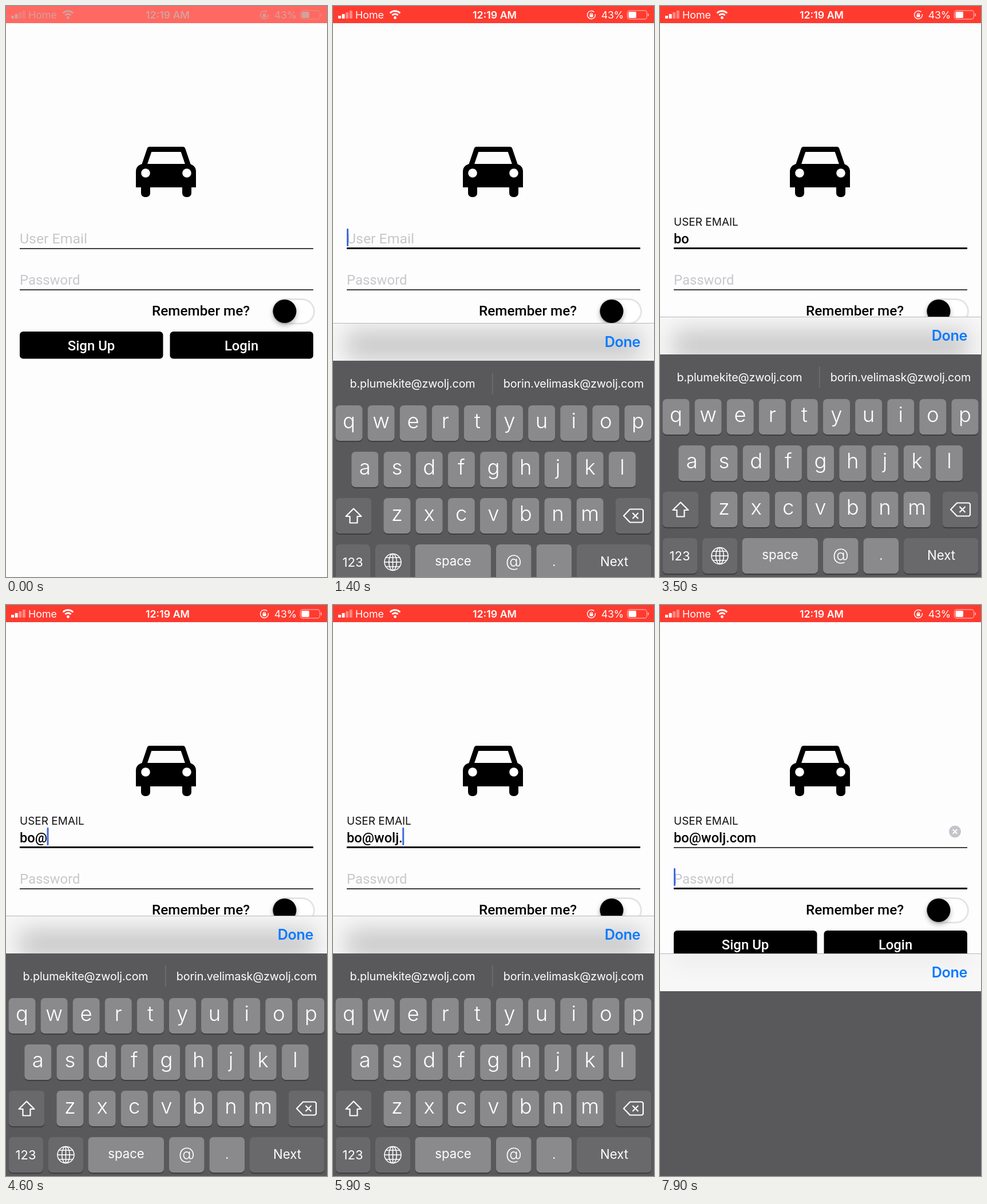
These frames come from a looping animation (561x998 px, 8 s). An HTML page with a canvas:

```html
<!DOCTYPE html>
<html lang="en">
<head>
<meta charset="utf-8">
<title>Login form</title>
<style>
html, body { margin: 0; width: 100%; height: 100%; overflow: hidden; background: #fff; }
canvas { display: block; width: 561px; height: 998px; }
</style>
</head>
<body>
<canvas id="stage" width="561" height="998"></canvas>
<script>
const ctx = document.getElementById('stage').getContext('2d');
const W = 561, H = 998, LOOP = 8000, STEP = 100;
const UI = 'Inter, sans-serif', FORM = 'Roboto, sans-serif';

const EMAIL = 'bo@wolj.com';
const HINTS = ['b.plumekite@zwolj.com', 'borin.velimask@zwolj.com'];
const PRESS = [2200, 2600, 4400, 4800, 5000, 5200, 5400, 5700, 6100, 6400, 6700];
const TYPED = [2400, 2800, 4600, 5000, 5200, 5400, 5500, 5900, 6200, 6600, 6900];
const FOCUS = 1200, NUMERIC = 7200, NEXT = 7700, SWAP = 7800, SECURE = 7900;

const BAR_TOP = 543, BAR_H = 66;
const KEY = '#8a898b', DARK_KEY = '#69686a', BOARD = '#59585a';

const clamp = v => Math.max(0, Math.min(1, v));
const mix = (a, b, k) => `rgb(${a.map((v, i) => Math.round(v + (b[i] - v) * k)).join()})`;

function text(str, x, y, size, { color = '#fff', weight = 400, align = 'left', font = UI, gap = 0 } = {}) {
  ctx.font = `${weight} ${size}px ${font}`;
  ctx.letterSpacing = gap + 'px';
  ctx.textAlign = align;
  ctx.fillStyle = color;
  ctx.fillText(str, x, y);
}

function box(x, y, w, h, r, color) {
  ctx.fillStyle = color;
  ctx.beginPath();
  ctx.roundRect(x, y, w, h, r);
  ctx.fill();
}

function disc(x, y, r, color) {
  ctx.fillStyle = color;
  ctx.beginPath();
  ctx.arc(x, y, r, 0, 7);
  ctx.fill();
}

function line(points, width, color, close) {
  ctx.beginPath();
  points.forEach(([x, y]) => ctx.lineTo(x, y));
  if (close) ctx.closePath();
  ctx.lineWidth = width;
  ctx.strokeStyle = color;
  ctx.lineJoin = 'round';
  ctx.stroke();
}

function arc(x, y, r, from, to, width, color) {
  ctx.beginPath();
  ctx.arc(x, y, r, from, to);
  ctx.lineWidth = width;
  ctx.strokeStyle = color;
  ctx.stroke();
}

function cross(x, y, r, width, color) {
  line([[x - r, y - r], [x + r, y + r]], width, color);
  line([[x + r, y - r], [x - r, y + r]], width, color);
}

function statusBar(t) {
  const k = clamp(t / 200);
  const ink = mix([212, 160, 158], [255, 255, 255], k);
  ctx.fillStyle = mix([255, 105, 97], [255, 59, 48], k);
  ctx.fillRect(0, 0, W, 30);

  for (let i = 0; i < 4; i++) {
    ctx.globalAlpha = i < 2 ? 1 : 0.4;
    box(9 + i * 6.6, 17 - i * 3, 5, 5 + i * 3, 1, ink);
  }
  ctx.globalAlpha = 1;
  text('Home', 39, 22, 17.8, { color: ink });

  const up = -Math.PI / 2;
  disc(108.5, 20.5, 2.4, ink);
  for (const r of [7, 12.2]) arc(108.5, 21, r, up - 0.8, up + 0.8, 3, ink);

  text('12:19 AM', 282.5, 22, 17.8, { color: ink, weight: 600, align: 'center' });

  arc(451.5, 15.5, 7, -0.2, 5.5, 1.4, ink);
  box(448.5, 14.5, 6, 5, 1, ink);
  arc(451.5, 14.5, 2, Math.PI, 0, 1.2, ink);

  text('43%', 508, 22, 17.8, { color: ink, align: 'right', gap: -0.2 });
  ctx.globalAlpha = 0.5;
  ctx.beginPath();
  ctx.roundRect(514.5, 8, 34, 15, 4);
  ctx.lineWidth = 1.4;
  ctx.strokeStyle = ink;
  ctx.stroke();
  box(550, 13, 2, 5, 1, ink);
  ctx.globalAlpha = 1;
  box(516.5, 10, 13.5, 11, 2, ink);
}

function car() {
  line([[241, 280], [251, 250.5], [309, 250.5], [319, 280]], 9, '#000');
  box(227, 276, 105, 41, [13, 13, 0, 0], '#000');
  for (const x of [244, 316]) {
    disc(x, 292, 7.8, '#fff');
    box(x - 8, 312, 16, 22, [0, 0, 7, 7], '#000');
  }
}

function caretAlpha(t) {
  const out = start => 1 - clamp((t - start + 100) / 300);
  if (t < 2200) return out(1700);
  if (t < 2400) return 1;
  if (t < 3800) return out(3300);
  if (t < 4300) return clamp((t - 3700) / 200);
  if (t < 4600) return out(4300);
  return 1;
}

function caret(x, y, alpha) {
  ctx.globalAlpha = alpha;
  box(x, y, 3, 31, 1, '#416be0');
  ctx.globalAlpha = 1;
}

function underline(y, active) {
  ctx.fillStyle = '#000';
  if (active) ctx.fillRect(24, y - 2, 513, 3);
  else ctx.fillRect(24, y - 0.7, 513, 1.5);
}

function form(t) {
  const onEmail = t >= FOCUS && t < SWAP, onPassword = t >= SWAP;
  const hint = { color: '#c7c7cc', font: FORM };
  const value = EMAIL.slice(0, TYPED.filter(s => t >= s).length);
  let end = 24;

  if (value) {
    const k = clamp((t - TYPED[0]) / 200);
    ctx.globalAlpha = k;
    text('USER EMAIL', 24, 384 + 20 * (1 - k), 19, { color: '#111' });
    ctx.globalAlpha = 1;
    text(value, 24, 415, 23.7, { color: '#000', weight: 500, font: FORM });
    end += ctx.measureText(value).width - 0.5;
  } else {
    text('User Email', 24, 415, 24.8, hint);
  }
  text('Password', 24, 487, 23.9, hint);
  underline(424, onEmail);
  underline(496, onPassword);
  if (onEmail) caret(end, 389, caretAlpha(t));
  if (onPassword) {
    caret(24, 460, 1);
    disc(515.5, 396, 10.5, '#c5c5c9');
    cross(515.5, 396, 3.7, 2, '#fff');
  }

  text('Remember me?', 426, 541, 24.3, { color: '#000', weight: 500, align: 'right', font: FORM });
  box(465, 511, 75, 45.5, 23, '#e4e4e7');
  box(468, 514, 69, 39.5, 20, '#fff');
  ctx.save();
  ctx.shadowColor = 'rgba(0,0,0,.3)';
  ctx.shadowBlur = 9;
  ctx.shadowOffsetY = 4;
  disc(487, 533.5, 20.5, '#000');
  ctx.restore();

  const label = { weight: 500, align: 'center', font: FORM };
  box(24, 569, 250.5, 47.5, 6, '#000');
  box(286.5, 569, 250.5, 47.5, 6, '#000');
  text('Sign Up', 149, 602, 24, label);
  text('Login', 411.5, 602, 23.8, label);
}

function toolbar(top) {
  ctx.save();
  ctx.beginPath();
  ctx.rect(0, top, W, BAR_H);
  ctx.clip();
  ctx.fillStyle = '#f7f7f8';
  ctx.fillRect(0, top, W, BAR_H);
  const y = Math.max(569, top);
  if (y < 616) {
    ctx.filter = 'blur(20px)';
    ctx.fillStyle = 'rgba(0,0,0,.2)';
    ctx.fillRect(24, y, 513, 616 - y);
    ctx.filter = 'none';
  }
  ctx.fillStyle = '#b6b6b9';
  ctx.fillRect(0, top, W, 1);
  ctx.restore();
  text('Done', 537, top + 42, 25.2, { color: '#0a7aff', weight: 600, align: 'right', gap: -0.4 });
}

function key(x, y, w, color = KEY) {
  box(x, y + 1.5, w, 62.5, 7, '#3e3d3f');
  box(x, y, w, 62, 7, color);
}

// Keys of one row: glyph, left edge, top edge, width
const row = (chars, x, y, pitch, w) => [...chars].map((c, i) => ({ c, x: x + i * pitch, y, w }));
const SHARED = [...row('@', 285, 930, 0, 61.5), ...row('.', 355.5, 930, 0, 61.5)];
const LETTERS = [
  ...row('qwertyuiop', 4.5, 687, 56.1, 47),
  ...row('asdfghjkl', 32.3, 768, 56.2, 47),
  ...row('zxcvbnm', 88.4, 849, 56.2, 47),
  ...SHARED
];
const SYMBOLS = [
  ...row('1234567890', 4.5, 687, 56.1, 47),
  ...row('$!~&=#[]', 15.7, 768, 67.3, 58.5),
  ...row('._-+', 88.2, 849, 98.6, 89),
  ...SHARED
];

function glyph({ c, x, y, w }, numeric) {
  const opts = { weight: 300, align: 'center' };
  if (y === 930) text(c, x + w / 2, y + (c === '@' ? 39 : 38), c === '@' ? 29 : 27, opts);
  else if (numeric) text(c, x + w / 2, y + 43.5, 33, opts);
  else text(c, x + w / 2, y + 40, 36.5, opts);
}

function popup({ c, x, y, w }) {
  const left = Math.max(3, x - 14), right = Math.min(W - 3, x + w + 14);
  const top = y - 86, waist = y - 24;
  ctx.save();
  ctx.shadowColor = 'rgba(0,0,0,.35)';
  ctx.shadowBlur = 4;
  ctx.shadowOffsetY = 1;
  ctx.fillStyle = KEY;
  ctx.beginPath();
  ctx.moveTo(left + 14, top);
  ctx.arcTo(right, top, right, waist, 14);
  ctx.lineTo(right, waist);
  ctx.bezierCurveTo(right, y - 6, x + w, y - 10, x + w, y + 10);
  ctx.arcTo(x + w, y + 62, x, y + 62, 7);
  ctx.arcTo(x, y + 62, x, y, 7);
  ctx.lineTo(x, y + 10);
  ctx.bezierCurveTo(x, y - 10, left, y - 6, left, waist);
  ctx.arcTo(left, top, right, top, 14);
  ctx.fill();
  ctx.restore();
  text(c, (left + right) / 2, y - 32, 50, { weight: 300, align: 'center' });
}

function shiftIcon() {
  line([[36, 867.5], [49.5, 881], [42.5, 881], [42.5, 892.5], [29.5, 892.5], [29.5, 881], [22.5, 881]], 2.2, '#fff', true);
}

function eraseIcon() {
  line([[508, 880], [519, 868.5], [540, 868.5], [542, 870.5], [542, 889.5], [540, 891.5], [519, 891.5]], 2.2, '#fff', true);
  cross(528.5, 880, 5, 2.2, '#fff');
}

function globeIcon(x, y) {
  arc(x, y, 14.5, 0, 7, 1.6, '#fff');
  ctx.beginPath();
  ctx.ellipse(x, y, 6.8, 14.5, 0, 0, 7);
  ctx.stroke();
  line([[x, y - 14.5], [x, y + 14.5]], 1.6, '#fff');
  line([[x - 14.5, y], [x + 14.5, y]], 1.6, '#fff');
  for (const d of [-8, 8]) line([[x - 12, y + d], [x + 12, y + d]], 1.5, '#fff');
}

function keys(t) {
  const numeric = t >= NUMERIC;
  const set = numeric ? SYMBOLS : LETTERS;
  const active = PRESS.findIndex((s, i) => t >= s && t < TYPED[i]);
  const held = active < 0 ? null : set.find(k => k.c === EMAIL[active]);
  const mid = { align: 'center' };

  HINTS.forEach((s, i) => text(s, i ? 420.5 : 139, 656, 19.8, { align: 'center', gap: -0.15 }));
  ctx.fillStyle = '#706f71';
  ctx.fillRect(278, 630, 1.5, 37);

  for (const k of set) {
    key(k.x, k.y, k.w);
    if (k !== held) glyph(k, numeric);
  }
  key(4.5, 849, 63, DARK_KEY);
  key(493.5, 849, 63, DARK_KEY);
  key(4.5, 930, 60.5, DARK_KEY);
  key(74, 930, 61, DARK_KEY);
  key(143.5, 930, 132.5);
  key(426, 930, 130.5, t === NEXT ? KEY : DARK_KEY);

  if (numeric) text('#+=', 35.5, 886, 16.5, mid);
  else shiftIcon();
  eraseIcon();
  text(numeric ? 'ABC' : '123', 34.5, numeric ? 967 : 969, numeric ? 20.5 : 22, mid);
  globeIcon(104.5, 961);
  text('space', 210, 967, 22.2, mid);
  text('Next', 491.5, 967.5, 22.2, mid);
  if (held) popup(held);
}

function keyboard(t) {
  // Critically damped slide-in
  const p = (t - 1095) * 0.01826;
  const off = t >= SECURE ? 66 : Math.round((H - BAR_TOP) * (1 + p) * Math.exp(-p));
  const top = BAR_TOP + off;
  toolbar(top);
  ctx.fillStyle = BOARD;
  ctx.fillRect(0, top + BAR_H, W, H);
  if (t >= SECURE) return;
  ctx.save();
  ctx.translate(0, off);
  keys(t);
  ctx.restore();
}

function draw(t) {
  ctx.fillStyle = '#fefdfe';
  ctx.fillRect(0, 0, W, H);
  statusBar(t);
  car();
  form(t);
  if (t >= FOCUS) keyboard(t);
}

const start = performance.now();
function tick() {
  const t = (performance.now() - start) % LOOP;
  draw(Math.floor(t / STEP) * STEP);
  requestAnimationFrame(tick);
}
tick();
</script>
</body>
</html>
```
